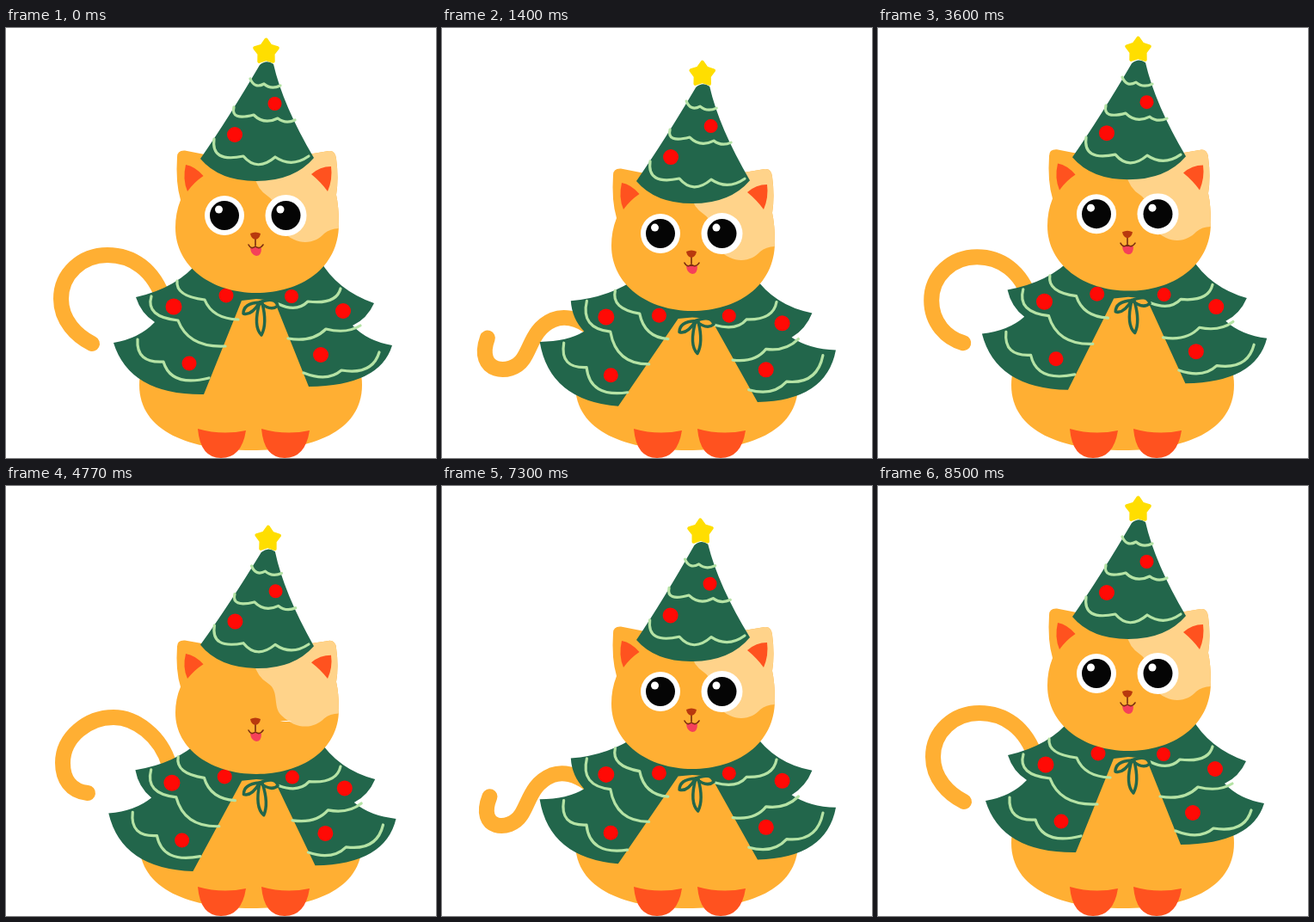
Animation, 500 px wide and 500 px high, one loop 8810 ms. Source, as an HTML page with a canvas:

```html
<!DOCTYPE html>
<html lang="en">
<head>
<meta charset="utf-8">
<title>Cat in a tree costume</title>
<style>
html, body { margin: 0; height: 100%; overflow: hidden; background: #fff; }
canvas { display: block; }
</style>
</head>
<body>
<canvas id="stage" width="500" height="500"></canvas>
<script>
const ctx = document.getElementById('stage').getContext('2d');
const ORANGE = '#ffaf33', CREAM = '#ffd38a', CORAL = '#ff521f', GREEN = '#22664b',
      MINT = '#b5e3a5', RED = '#ff0a05', YELLOW = '#ffde00';
const LOOP = 8810, CYCLE = 63;

// step, face y, head squash, hat y, hat tilt, cape spread, neck y, bow swing
const KEYS = [
  [0, 0, 1, 0, 0, 0, 0, 0],
  [5, 32, .94, 34, 1, .3, 26, -4],
  [8, 33, .95, 36, 5, 1.04, 27, -15],
  [10, 32, .97, 36, 7.5, .87, 25, -20],
  [13, 27, .99, 31, 4, .58, 22.5, -8],
  [17, 22, 1, 27, 1.2, .57, 21.5, 0],
  [21, 21, 1, 26, 0, .6, 21.5, 0],
  [40, 21, 1, 26, 0, .6, 21.5, 0],
  [41, 21, 1, 26, -.9, .6, 21, -1],
  [44, 2, .99, 3, -4, .68, 0, -6],
  [47, -10, .975, -10, 0, 1, -12, -18],
  [53, 1, 1, 1, 0, -.06, 1, 3],
  [58, 0, 1, 0, 0, 0, 0, 0],
  [63, 0, 1, 0, 0, 0, 0, 0]
];

const CURL = 'M184,318C172,280,146,264,118,264C88,264,64,286,64,315C64,340,82,358,100,367';
const CURL_LOW = 'M190,325C180,290,150,269,125,269C95,269,66,292,66,322C66,340,75,355,95,357';
const CURL_HIGH = 'M160,318C150,285,128,273,107,273C78,273,57,295,57,322C57,350,72,368,97,364';
const WAVE = 'M170,347C156,338,141,335,129,340C106,350,104,372,94,386C80,406,38,402,53,361';
const WAVE_HIGH = 'M166,316C156,314,146,312,134,315C110,320,103,338,95,352C82,376,40,382,48,342';
const TAIL = [[0, CURL], [5, CURL_LOW], [10, WAVE_HIGH], [21, WAVE], [40, WAVE],
              [47, CURL_HIGH], [53, CURL], [63, CURL]];

// Each cape part has a closed and a spread form.
const CAPE = [
  ['M291,290L225,270Q200,302,151,313Q157,332,173,342Q155,361,125,366Q144,427,230,426L274,317L291,315Z',
   'M291,288L230,267Q192,285,149,284Q147,306,160,324Q140,331,106,328Q112,401,188,413L275,316L291,315Z'],
  ['M291,290L365,270Q385,305,428,320Q420,338,403,346Q420,364,449,369Q435,416,352,417L312,317L291,315Z',
   'M291,288L360,263Q388,300,432,303Q425,322,409,333Q432,344,464,342Q455,409,377,411L313,316L291,315Z']
];
const GARLANDS = [
  ['M199,294Q197,312,231,316Q240,338,270,339', 'M203,277Q196,300,229,307Q232,338,258,341'],
  ['M169,312Q162,336,200,340Q212,372,255,370', 'M168,285Q160,322,193,326Q196,368,231,369'],
  ['M153,362Q151,390,183,388Q192,418,236,407', 'M134,333Q127,364,158,363Q158,402,202,399'],
  ['M389,303Q384,322,351,318Q338,331,317,321', 'M389,293Q386,316,356,317Q346,331,318,326'],
  ['M412,346Q396,356,372,350Q356,366,328,361', 'M416,336Q402,354,380,353Q370,369,345,367'],
  ['M434,377Q426,404,390,398Q374,412,346,401', 'M449,347Q443,386,408,384Q392,404,364,398']
];
// closed x, y, spread x, y, radius
const BAUBLES = [
  [195, 324, 188, 308, 9.5], [256, 311, 250, 314, 8.5], [213, 390, 185, 377, 8.5],
  [332, 312, 335, 314, 8], [392, 329, 398, 317, 9], [366, 380, 384, 373, 9]
];
const HEAD = 'M199,150Q199,142,208,142.5L236,148H345L375,143Q383,142,384,152Q387,175,384,194' +
  'Q387,208,387,228C387,280,342,308,291,308C240,308,197,278,197,232Q197,215,203,200Q197,180,199,150Z';
const HAT_GARLANDS = 'M284,59Q289,71,300,65Q308,72,319,67M265,92Q261,108,288,101Q300,113,316,105' +
  'Q325,112,336,107M242,129Q238,157,276,149Q292,168,313,150Q332,163,352,149';

const lerp = (a, b, k) => a + (b - a) * k;

function mixPath(a, b, k) {
  const ends = b.match(/[\d.]+/g);
  let i = 0;
  return a.replace(/[\d.]+/g, v => lerp(+v, +ends[i++], k).toFixed(2));
}

function fill(path, color) {
  ctx.fillStyle = color;
  ctx.fill(new Path2D(path));
}

function stroke(path, color, width) {
  ctx.strokeStyle = color;
  ctx.lineWidth = width;
  ctx.stroke(new Path2D(path));
}

function dot(x, y, r, color) {
  ctx.fillStyle = color;
  ctx.beginPath();
  ctx.arc(x, y, r, 0, 7);
  ctx.fill();
}

function group(draw) {
  ctx.save();
  draw();
  ctx.restore();
}

function turn(x, y, degrees) {
  ctx.translate(x, y);
  ctx.rotate(degrees * Math.PI / 180);
  ctx.translate(-x, -y);
}

const segment = (keys, step) => Math.max(0, keys.findIndex(k => k[0] > step) - 1);

// Monotone cubic through the keys
function poseAt(step) {
  const i = segment(KEYS, step), [a, b] = [KEYS[i], KEYS[i + 1]];
  const span = b[0] - a[0], u = (step - a[0]) / span;
  const rate = (n, c) => KEYS[n] && KEYS[n + 1]
    ? (KEYS[n + 1][c] - KEYS[n][c]) / (KEYS[n + 1][0] - KEYS[n][0]) : 0;
  const slope = (p, q) => p * q > 0 ? 2 * p * q / (p + q) : 0;
  return a.slice(1).map((v, j) => {
    const c = j + 1, mid = rate(i, c);
    const m0 = slope(rate(i - 1, c), mid) * span, m1 = slope(mid, rate(i + 1, c)) * span;
    const d = b[c] - v;
    return v + u * (m0 + u * (3 * d - 2 * m0 - m1 + u * (m0 + m1 - 2 * d)));
  });
}

function drawTail(step) {
  const i = segment(TAIL, step), [from, a] = TAIL[i], [to, b] = TAIL[i + 1];
  const u = (step - from) / (to - from);
  stroke(mixPath(a, b, u * u * (3 - 2 * u)), ORANGE, 18);
}

function drawBody() {
  fill('M285,285C225,300,155,360,155,415C155,470,215,491,285,491C355,491,414,470,414,415C414,360,345,300,285,285Z', ORANGE);
  for (const x of [223, 297])
    fill(`M${x},466Q${x + 28},474,${x + 56},468Q${x + 51},500,${x + 27},500Q${x + 3},500,${x},466Z`, CORAL);
}

function drawCape(spread, swing) {
  for (const [a, b] of CAPE) fill(mixPath(a, b, spread), GREEN);
  for (const [a, b] of GARLANDS) stroke(mixPath(a, b, spread), MINT, 3.2);
  for (const [x, y, x2, y2, r] of BAUBLES) dot(lerp(x, x2, spread), lerp(y, y2, spread), r, RED);
  turn(295, 318, swing * .4);
  stroke('M295,319Q276,320,276,332Q285,335,295,319Q313,312,316,323Q308,330,295,319', GREEN, 3.5);
  turn(295, 318, swing * .6);
  stroke('M295,319Q287,347,297,357Q304,344,298,320', GREEN, 3.5);
}

function drawHead(squash) {
  ctx.translate(0, 225);
  ctx.scale(1, squash);
  ctx.translate(0, -225);
  fill(HEAD, ORANGE);
  group(() => {
    ctx.clip(new Path2D(HEAD));
    fill('M288,170Q292,188,305,196C318,205,310,225,320,235C340,256,360,250,370,239Q377,233,388,233V140H288Z', CREAM);
  });
  fill('M209,159Q220,161,229.5,172Q219,179,211,190Q205,176,209,159Z', CORAL);
  fill('M378,161Q365,161,355,170Q366,179,374,190Q380,176,378,161Z', CORAL);
}

function drawFace(lid) {
  group(() => {
    ctx.beginPath();
    ctx.rect(200, 194 + 48 * lid, 180, 60);
    ctx.clip();
    for (const [x, r] of [[254, 23], [325.5, 24]]) {
      dot(x, 218, r, '#fff');
      dot(x, 218, 17, '#050505');
      dot(x - 6.5, 211, 4.5, '#fff');
    }
  });
  fill('M284,256Q290,253,297,256Q297,265,291,265Q285,264,284,256Z', '#f5405a');
  stroke('M290,245V253M282,252Q285,258,290,254Q295,258,299,252', '#7a2c10', 1.6);
  fill('M284,239Q290,236,296,239Q295,245,290,246Q285,245,284,239Z', '#b8390e');
}

function drawHat() {
  ctx.beginPath();
  for (let i = 0; i < 10; i++) {
    const a = i * Math.PI / 5, r = i % 2 ? 8.5 : 14;
    ctx.lineTo(302.5 + r * Math.sin(a), 27.5 - r * Math.cos(a));
  }
  ctx.closePath();
  ctx.fillStyle = ctx.strokeStyle = YELLOW;
  ctx.lineWidth = 4;
  ctx.fill();
  ctx.stroke();
  fill('M295,43Q303,36,311,42Q322,90,358,151Q335,178,291,178Q248,178,226,152Q258,106,295,43Z', GREEN);
  stroke(HAT_GARLANDS, MINT, 3.2);
  dot(312.5, 88, 8, RED);
  dot(266, 124, 9, RED);
}

// Ten pictures per 700 ms, the first held a little longer
function stepAt(ms) {
  const t = ms % LOOP;
  const step = 10 * Math.floor(t / 700) + Math.max(0, Math.floor((t % 700 - 26) / 66.6));
  return step % CYCLE;
}

function render() {
  const step = stepAt(performance.now());
  const [faceY, squash, hatY, tilt, spread, neckY, swing] = poseAt(step);
  const lid = Math.max(0, Math.min(.98, 1.3 - Math.abs(step - 5) * .5));
  ctx.lineCap = ctx.lineJoin = 'round';
  ctx.fillStyle = '#fff';
  ctx.fillRect(0, 0, 500, 500);
  drawTail(step);
  drawBody();
  group(() => { ctx.translate(0, neckY); drawCape(spread, swing); });
  group(() => { ctx.translate(0, faceY); drawHead(squash); });
  group(() => { ctx.translate(0, faceY); drawFace(lid); });
  group(() => { ctx.translate(0, hatY); turn(292, 150, tilt); drawHat(); });
  requestAnimationFrame(render);
}
render();
</script>
</body>
</html>
```
